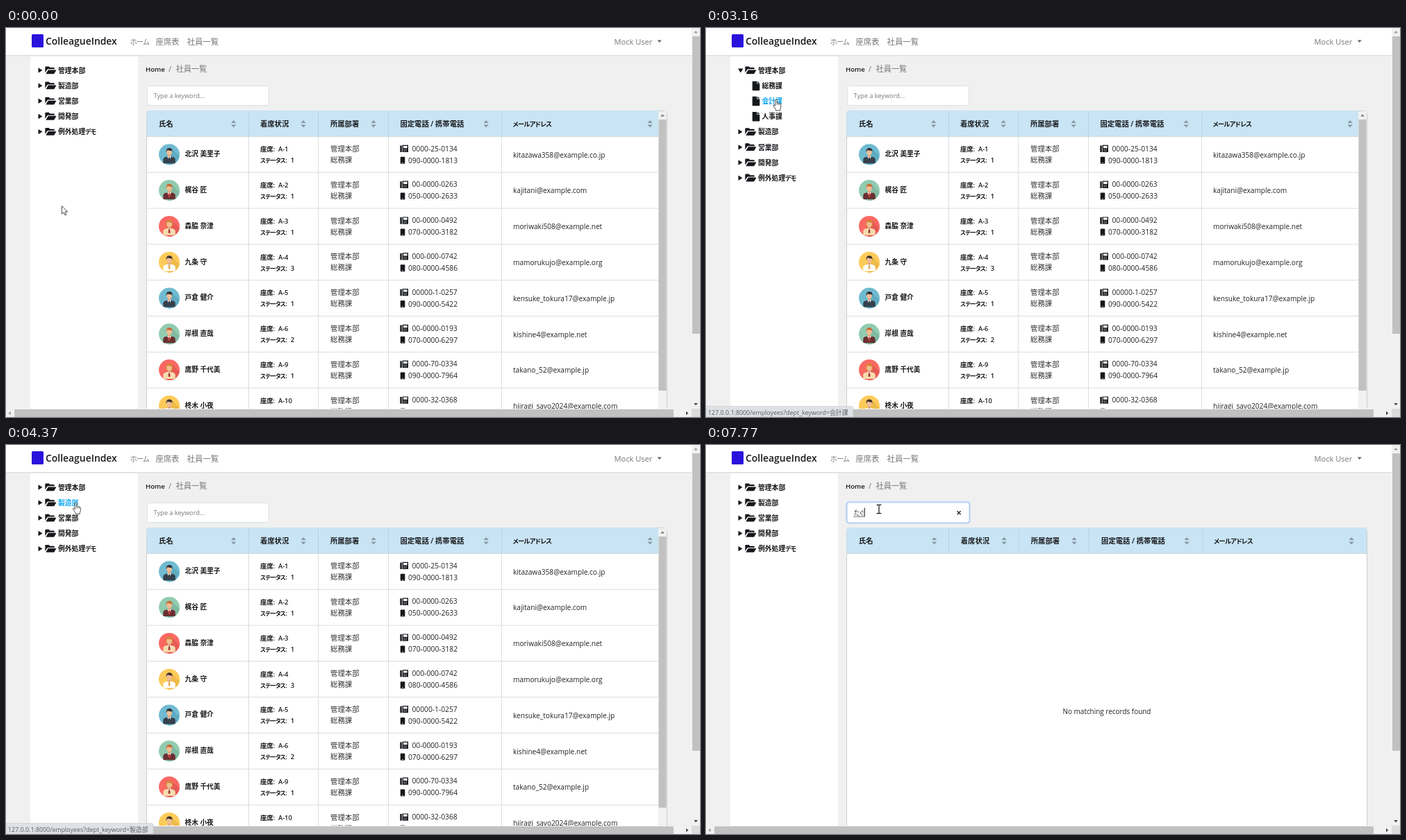
Write an HTML page that moves like this. It is 999 by 561 pixels and loops after 8 s.

```html
<!DOCTYPE html>
<html lang="ja">
<head>
<meta charset="utf-8">
<title>ColleagueIndex</title>
<style>
html, body { margin: 0; width: 100%; height: 100%; overflow: hidden; background: #f0f0f0; }
svg { display: block; width: 999px; height: 561px; font-family: "Open Sans", "Noto Sans", "Noto Sans CJK JP", sans-serif; }
text { white-space: pre; }
.kana { font-feature-settings: "palt"; font-size: .9em; letter-spacing: -.07em; }
#typed text { letter-spacing: -.16em; }
</style>
</head>
<body>
<svg id="stage" viewBox="0 0 999 561" xmlns="http://www.w3.org/2000/svg"></svg>
<script>
const LOOP = 8000, ROW = 51.8, INK = '#16181b', HOVER = '#0aa5f0', THUMB = '#c1c1c1';
const stage = document.getElementById('stage');
const el = id => document.getElementById(id);

// Katakana is set narrower than kanji.
const tighten = s => s.replace(/[ァ-ー]+/g, '<tspan class="kana">$&</tspan>');
const text = (x, y, s, size, fill = INK, weight = 400, attrs = '') =>
  `<text x="${x}" y="${y}" font-size="${size}" fill="${fill}" font-weight="${weight}" ${attrs}>${tighten(s)}</text>`;
const rect = (x, y, w, h, fill, attrs = '') =>
  `<rect x="${x}" y="${y}" width="${w}" height="${h}" fill="${fill}" ${attrs}/>`;
const path = (d, fill = INK, attrs = '') => `<path d="${d}" fill="${fill}" ${attrs}/>`;
const group = (id, content) => `<g id="${id}">${content}</g>`;
const shift = (x, y, content) => `<g transform="translate(${x} ${y})">${content}</g>`;

// Navigation, breadcrumb and search box
function pageTop() {
  return rect(0, 39, 987, 1, '#dedede') + rect(0, 40, 987, 1, '#e9e9e9') + rect(0, 0, 987, 39, '#fff') +
    rect(37, 9, 17, 19, '#2a12dc', 'rx="1.5"') +
    text(57, 24.3, 'ColleagueIndex', 13.9, INK, 600) +
    text(179, 23.5, 'ホーム', 11.2, '#777') + text(215.5, 23.5, '座席表', 11.3, '#777') +
    text(260.5, 23.5, '社員一覧', 11.4, '#777') +
    text(875.5, 23.8, 'Mock User', 11.1, '#777') + path('M937.5 17.5h6.4l-3.2 3.4z', '#666') +
    text(201, 62.5, 'Home', 9.6, INK, 600) + text(234, 62.5, '/', 11, '#6c757d') +
    text(244.5, 62.8, '社員一覧', 11.2, '#777');
}

function searchBox() {
  return rect(203.5, 83.5, 175, 28, '#fff', 'rx="3" stroke="#dcdfe2"') +
    group('focus', rect(202.5, 82.5, 177, 30, '#fff', 'rx="3.5" stroke="#b4d0f8" stroke-width="2.2"')) +
    group('placeholder', text(212.5, 101.3, 'Type a keyword...', 9.2, '#75797e')) +
    group('typed', text(212.5, 101.3, '', 9, '#333') +
      path('', 'none', 'stroke="#444" stroke-width=".8"') +
      path('M361.6 95.2l5 5m0-5l-5 5', 'none', 'stroke="#333" stroke-width="1.6"')) +
    rect(0, 90.5, 1, 13, '#111', 'id="caret"');
}

// Department tree
const triangle = open => open
  ? path('M46 58.5h7.6l-3.8 6z') : path('M46.5 57.3v7.4l6-3.7z');
const folder = path('M56.3 64.5V56.6q0-1.2 1.2-1.2h4.2l1.7 1.7h5.2q1.2 0 1.2 1.2v1h-9.1q-1 0-1.5.8zM57.5 66l2.9-5q.3-.6 1-.6h10.3q.8 0 .4.8l-2.5 4.3q-.4.7-1.1.7h-10.6q-.7 0-.4-.2z');
const file = path('M67.5 54.5h5.7v3.7h4.1v9q0 .8-.8.8h-9q-.8 0-.8-.8v-11.9q0-.8.8-.8zM74 54.5l3.3 3h-3.3z');
const depts = ['管理本部', '製造部', '営業部', '開発部', '例外処理デモ'];
const sections = ['総務課', '会計課', '人事課'];
const link = (x, name) => text(x, 64.7, name, 9.8, INK, 600, `data-link="${name}"`);
const deptRow = (name, i) => shift(0, i * 22.15, triangle(false) + folder + link(75, name));

function tree() {
  return rect(35, 41, 155, 508, '#fff') +
    group('closedArrow', triangle(false)) + group('openArrow', triangle(true)) +
    folder + link(75, depts[0]) +
    group('sections', sections.map((s, i) => shift(0, (i + 1) * 22.15, file + link(80.5, s))).join('')) +
    group('otherDepts', depts.slice(1).map((d, i) => deptRow(d, i + 1)).join(''));
}

// Table
const looks = [
  { bg: '#70bbd1', shade: '#5fabc2', hair: '#2f3138', coat: '#36404c', shirt: '#fff', tie: '#36404c' },
  { bg: '#91cbb0', shade: '#80baa0', hair: '#c96a33', coat: '#6b2f31', shirt: '#fff', tie: '#c2433d' },
  { bg: '#fa6863', shade: '#e65a56', hair: '#d98235', coat: '#f6dcae', shirt: '#fff3d9', tie: '#a33b38', long: true },
  { bg: '#fdcb59', shade: '#eebb4a', hair: '#3b302d', coat: '#fff', shirt: '#f4f4f4', tie: '#e2b05a' }
];
const avatar = p => `<circle r="15" fill="${p.bg}"/><g clip-path="url(#disc)">` +
  path('M4-8L20 8V20H0L-4 3z', p.shade) + '<g transform="scale(.92)">' +
  (p.long ? path('M-5.5-4q0-6 5.5-6t5.5 6v5h-11z', p.hair) : '') +
  path('M-9.5 14V8q0-3 4-4l5.5-1 5.5 1q4 1 4 4v6z', p.coat) +
  path('M-3.2 3L0 10l3.2-7z', p.shirt) + path('M-1 4.5h2l.7 5L0 11.5l-1.7-2z', p.tie) +
  path('M-2-1h4v4L0 5-2 3z', '#dfa67d') +
  '<ellipse cy="-3.6" rx="4.2" ry="5.2" fill="#f0bd94"/>' +
  path('M-4.7-3.5q-.8-6.5 4.7-6.7t4.7 6.7l-1.2-2.4q-4 .4-6-1.3-.7 1.6-2.2 3.7z', p.hair) + '</g></g>';

const fax = path('M567.3 169.5h2.5v9.6h-2.5zM570.6 168.8h8.4v10.3h-8.4zM572 170v3.2h5.6V170zM572.6 174.8v1h1.2v-1zm2.6 0v1h1.2v-1zm-2.6 2v1h1.2v-1zm2.6 0v1h1.2v-1z', INK, 'fill-rule="evenodd"');
const mobile = rect(567.7, 185.8, 6.6, 10, INK, 'rx="1"') + rect(570, 194, 2, .8, '#ddd');
const people = [
  ['北沢 美里子', '1', 1, '0000-25-0134', '090-0000-1813', 'kitazawa358@example.co.jp'],
  ['梶谷 匠', '2', 1, '00-0000-0263', '050-0000-2633', 'kajitani@example.com'],
  ['森脇 奈津', '3', 1, '00-0000-0492', '070-0000-3182', 'moriwaki508@example.net'],
  ['九条 守', '4', 3, '000-000-0742', '080-0000-4586', 'mamorukujo@example.org'],
  ['戸倉 健介', '5', 1, '00000-1-0257', '090-0000-5422', 'kensuke_tokura17@example.jp'],
  ['岸根 直哉', '6', 2, '00-0000-0193', '070-0000-6297', 'kishine4@example.net'],
  ['鷹野 千代美', '9', 1, '0000-70-0334', '090-0000-7964', 'takano_52@example.jp'],
  ['柊木 小夜', '10', 1, '0000-32-0368', '090-0000-8125', 'hiiragi_sayo2024@example.com']
];
const personRow = ([name, seat, status, phone, cell, mail], i) => shift(0, i * ROW,
  shift(235, 182.3, avatar(looks[i % 4])) + text(257.5, 185.2, name, 9.7, INK, 600) +
  text(366, 178.2, '座席:  A-' + seat, 9.3, INK, 600) + text(366, 194.2, 'ステータス:  ' + status, 9.3, INK, 600) +
  text(467, 178, '管理本部', 10.4, '#333') + text(467, 194, '総務課', 10.4, '#333') +
  fax + mobile + text(584.5, 177.7, phone, 10.25, '#222') + text(579, 194.7, cell, 10.25, '#222') +
  text(730, 186.7, mail, 10.1, '#222') + rect(203, 207.8, 736, 1, '#d9dcdf'));

const columns = [[220, 324], [366, 424.5], [467, 525.5], [567.5, 687.5], [729.5, 923.5]];
const titles = ['氏名', '着席状況', '所属部署', '固定電話 / 携帯電話', 'メールアドレス'];
const dividers = [349, 449, 550, 713];
const sorter = x => path(`M${x} 137l3.6-4 3.6 4zm0 2.4h7.2l-3.6 4z`, '#8798a5');

// Without the inner scrollbar the columns spread slightly.
function header(full) {
  const spread = i => full ? Math.ceil(i / 2) * .8 : 0;
  return path(`M202.5 156.5V123q0-4 4-4H${full ? '947q4 0 4 4' : '939'}V156.5z`, '#c9e4f4') +
    rect(203, 156, full ? 748 : 736, 1, '#cfd8de') +
    titles.map((s, i) => text(columns[i][0] + spread(i), 141.5, s, 10.3, INK, 600) +
      sorter(columns[i][1] + (full ? 1 + (i === 4) : 0))).join('') +
    dividers.map((x, i) => rect(x + spread(i), 119.5, 1, 37, '#bdd3e0')).join('');
}

function table() {
  return `<g clip-path="url(#view)">` +
    rect(202.5, 119.5, 749, 440, '#fff', 'rx="4" stroke="#cacdd0"') +
    group('records', header(false) + people.map(personRow).join('') +
      dividers.map(x => rect(x, 157, 1, 400, '#d9dcdf')).join('') +
      rect(939, 120, 12, 440, '#f1f1f1') + rect(939.5, 132, 11, 391, THUMB) +
      path('M942.2 127.5h5.6l-2.8-3.2z', '#777')) +
    group('noRecords', header(true) + text(577, 388, 'No matching records found', 9.95, '#222', 400, 'text-anchor="middle"')) +
    '</g>';
}

function scrollbars() {
  return rect(987, 0, 12, 549, '#f1f1f1') + rect(988, 12, 11, 429, THUMB) +
    rect(0, 549, 987, 12, '#f1f1f1') + rect(12, 550, 949, 11, THUMB) + rect(987, 549, 12, 12, '#dcdcdc') +
    path('M990.2 7.3h5.6l-2.8-3.2z', '#999') + path('M990.2 541h5.6l-2.8 3.2z', '#444') +
    path('M6.6 552.7v5.6l-3.2-2.8z', '#999') + path('M979 552.7v5.6l3.2-2.8z', '#444');
}

const statusBar = () => group('status',
  path('M0 545.5H209q3 0 3 3V561H0z', '#dee1e6', 'stroke="#c8cbd0" stroke-width=".6"') +
  text(3, 558, '', 8.9, '#5a5d61', 400, 'id="url"'));

const outline = 'stroke="#222" stroke-width=".8" stroke-linejoin="round"';
const cursors = () =>
  '<circle id="click" r="9.5" fill="#ff0" fill-opacity=".47"/>' +
  group('arrow', path('M.4.5V12.3L3.1 9.8 5 14l1.9-.8L5 9.1H8.7z', '#fff', outline)) +
  group('hand', path('M-1.2 1.3Q0-.5 1.2 1.3V6q1-.9 2 .3 1-.6 1.8.6 1.4-.5 1.8 1.2v3.6q0 1.8-1.1 3.1V17H-.4v-1.6Q-2.2 13-3.9 10.1q-.4-1.6 1.2-1.6l1.5 1.7z', '#fff', outline) +
    path('M1.2 6v3m2-2.5V9M5 7v2', 'none', 'stroke="#222" stroke-width=".6"')) +
  group('beam', path('M-3.3-6.2h2.5l.8.7.8-.7h2.5M0-5.5v11M-3.3 6.2h2.5l.8-.7.8.7h2.5', 'none', 'stroke="#111" stroke-width="1.2"'));

stage.innerHTML =
  '<defs><clipPath id="disc"><circle r="15"/></clipPath><clipPath id="view"><rect y="41" width="987" height="508"/></clipPath></defs>' +
  rect(0, 0, 999, 561, '#f0f0f0') + tree() + pageTop() + searchBox() + table() + scrollbars() + statusBar() + group('pointer', cursors());

// Each list holds [time, value]; the value lasts until the next time.
const timeline = {
  hover: [[0, ''], [860, '製造部'], [1180, ''], [2540, '会計課'], [3290, '総務課'], [4150, ''], [4370, '製造部'], [4950, '']],
  open: [[0, false], [1780, true], [4290, false]],
  url: [[0, '製造部'], [2000, '会計課'], [3420, '総務課'], [4220, '製造部']],
  statusAlpha: [[0, 0], [1180, .3], [1250, .6], [1320, .42], [1390, .2], [1450, 0], [2870, .5], [2940, 1], [5290, .6], [5360, .3], [5420, 0]],
  cursor: [[0, 'arrow'], [860, 'hand'], [4950, 'arrow'], [5090, 'beam']],
  click: [[0, false], [1650, true], [1780, false], [3690, true], [3820, false], [5490, true], [5620, false]],
  focus: [[0, 0], [5490, .5], [5550, 1]],
  caret: [[0, false], [5490, true], [6030, false], [6570, true]],
  typed: [[0, ''], [6820, 'た'], [7370, 'たｇ'], [7770, 'たぐ']]
};
const at = (name, t) => timeline[name].findLast(([time]) => time <= t)[1];

// Pointer moves: first step, last step, number of steps, target
const moves = [
  [440, 990, 8, 79, 84], [1180, 1320, 3, 55, 59.5], [2180, 2540, 6, 102, 107], [2600, 2670, 2, 101, 104.5],
  [3160, 3420, 5, 100.5, 82.5], [4950, 5090, 3, 238, 93], [5290, 5420, 3, 249, 92.5]
];
function pointerAt(t) {
  let x = 80, y = 256;
  for (const [start, end, steps, toX, toY] of moves) {
    if (t < start) break;
    const step = Math.min(steps, 1 + Math.floor((t - start) / (end - start) * (steps - 1) + .1));
    const p = step / steps, ease = p * p * (3 - 2 * p);
    x += (toX - x) * ease;
    y += (toY - y) * ease;
  }
  return [x, y];
}

const show = (id, visible) => el(id).style.display = visible ? '' : 'none';
const links = [...document.querySelectorAll('[data-link]')];
const [typedText, underline] = el('typed').children;

function render(t) {
  const hover = at('hover', t), open = at('open', t), typed = at('typed', t), cursor = at('cursor', t);
  for (const node of links) node.setAttribute('fill', node.dataset.link === hover ? HOVER : INK);
  show('sections', open);
  show('openArrow', open);
  show('closedArrow', !open);
  el('otherDepts').setAttribute('transform', `translate(0 ${open ? 66.6 : 0})`);

  el('status').setAttribute('opacity', at('statusAlpha', t));
  el('url').textContent = '127.0.0.1:8000/employees?dept_keyword=' + at('url', t);

  el('focus').setAttribute('opacity', at('focus', t));
  show('placeholder', !typed);
  show('typed', typed);
  typedText.textContent = typed;
  const textEnd = 212.5 + typed.length * 7.6;
  underline.setAttribute('d', `M212.5 103.3H${textEnd}`);
  show('caret', at('caret', t));
  el('caret').setAttribute('x', textEnd);
  show('records', !typed);
  show('noRecords', typed);

  el('pointer').setAttribute('transform', `translate(${pointerAt(t).join(' ')})`);
  for (const kind of ['arrow', 'hand', 'beam']) show(kind, kind === cursor);
  show('click', at('click', t));
}

const began = performance.now();
function tick() {
  render((performance.now() - began) % LOOP);
  requestAnimationFrame(tick);
}
tick();
</script>
</body>
</html>
```
